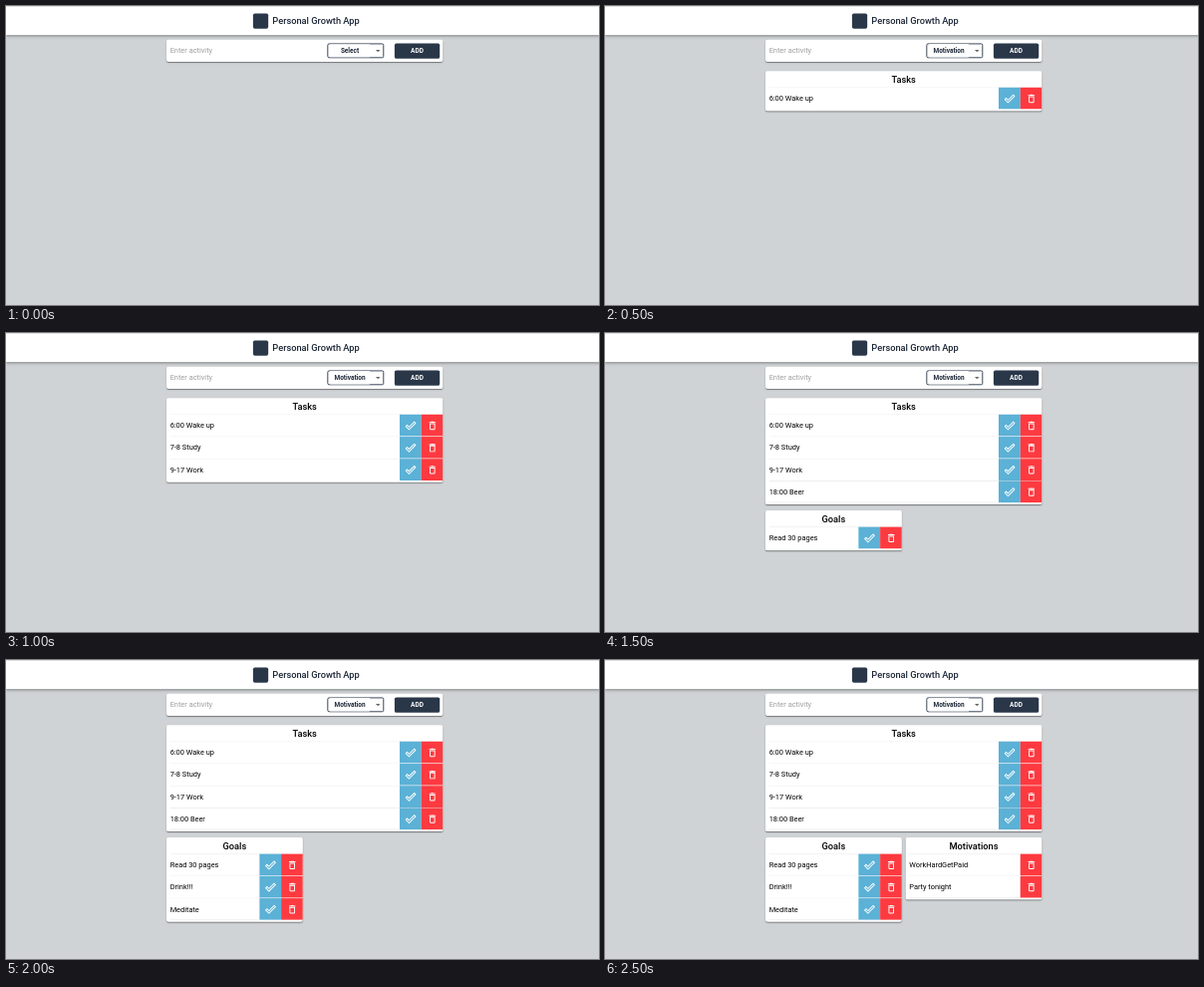
These frames come from a looping animation (595 px wide and 300 px high, 3000 ms). An HTML page:

```html
<!DOCTYPE html>
<html lang="en">
<head>
<meta charset="utf-8">
<title>Personal Growth App</title>
<style>
  html, body { margin: 0; width: 100%; height: 100%; overflow: hidden; background: #cfd3d5; }
  #app {
    position: absolute; left: 0; top: 0; width: 1288px; height: 650px;
    transform: scale(.4625); transform-origin: 0 0;
    font: 16px/48px Roboto, sans-serif; color: #000; white-space: nowrap;
  }
  #app * { box-sizing: border-box; }
  header, .logo, h1, .card, .field, .select, .select span, .select i, .add { position: absolute; margin: 0; }
  header {
    left: 0; top: 0; width: 100%; height: 63px; background: #fff; border-top: 1px solid #bbb;
    box-shadow: 0 2px 4px -1px #0003, 0 4px 5px #00000024, 0 1px 10px #0000001f;
  }
  .logo { left: 536px; top: 15px; width: 33px; height: 33px; border-radius: 4px; background: #2a3749; }
  h1, h2 { font-size: 20px; font-weight: 500; }
  h1 { left: 578px; top: 7px; color: #1d2737; }
  h2 { margin: 0; height: 35px; padding-top: 2px; line-height: 35px; text-align: center; }
  .card {
    padding-bottom: 4px; background: #fff; border-radius: 4px;
    box-shadow: 0 2px 1px -1px #0003, 0 1px 1px #00000024, 0 1px 3px #0000001f, 0 2px 3px #0004;
  }
  .bar { left: 348px; top: 73px; width: 600px; height: 48px; }
  .field { left: 8px; top: -1px; color: #9d9d9d; }
  .select {
    left: 349px; top: 8px; width: 123px; height: 32px; border: 2px solid #2a3749; border-radius: 4px;
    font: 700 14px/28px Roboto, sans-serif; text-align: center; color: #1d2737;
  }
  .select span { left: 4px; top: 0; width: 86px; background: #fff; }
  .select i { left: 103px; top: 12px; border: 5px solid transparent; border-top-color: #666; border-bottom: 0; }
  .add {
    left: 495px; top: 8px; width: 98px; height: 33px; border-radius: 4px; background: #2a3749; color: #fff;
    font: 700 14px/33px Roboto, sans-serif; letter-spacing: .4px; text-align: center;
  }
  .row { display: flex; overflow: hidden; padding-left: 8px; }
  .row p { flex: 1; margin: 0; height: 48px; border-top: 1px solid #ddd; }
  .row:last-child p { border-bottom: 1px solid #ddd; }
  .btn { width: 47px; height: 48px; padding: 12px 11.5px; border-top: 1px solid #e4e4e4; }
  .btn svg { display: block; width: 24px; height: 24px; fill: #fff; }
  .done { background: #5bb1d6; }
  .trash { background: #fd3a40; }

  .s1, .s2, .s3, .s4, .s5 { animation: 3s step-end infinite; }
  .s1 { animation-name: s1; }
  .s2 { animation-name: s2; }
  .s3 { animation-name: s3; }
  .s4 { animation-name: s4; }
  .s5 { animation-name: s5; }
  @keyframes s1 { 0% { max-height: 0; visibility: hidden } 16.6667%, 100% { max-height: 300px; visibility: visible } }
  @keyframes s2 { 0% { max-height: 0; visibility: hidden } 33.3333%, 100% { max-height: 300px; visibility: visible } }
  @keyframes s3 { 0% { max-height: 0; visibility: hidden } 50%, 100% { max-height: 300px; visibility: visible } }
  @keyframes s4 { 0% { max-height: 0; visibility: hidden } 66.6667%, 100% { max-height: 300px; visibility: visible } }
  @keyframes s5 { 0% { max-height: 0; visibility: hidden } 83.3333%, 100% { max-height: 300px; visibility: visible } }
</style>
</head>
<body>
<div id="app">
  <header><div class="logo"></div><h1>Personal Growth App</h1></header>
  <div class="card bar">
    <div class="field">Enter activity</div>
    <div class="select"><span>Select</span><span class="s1">Motivation</span><i></i></div>
    <div class="add">ADD</div>
  </div>
</div>
<script>
  const icons = {
    done: 'M19.77 5.03l1.4 1.4L8.43 19.17l-5.6-5.6 1.4-1.4 4.2 4.2L19.77 5.03m0-2.83L8.43 13.54l-4.2-4.2L0 13.57 8.43 22 24 6.43z',
    trash: 'M6 19c0 1.1.9 2 2 2h8c1.1 0 2-.9 2-2V7H6v12zM8 9h8v10H8V9zm7.5-5l-1-1h-5l-1 1H5v2h14V4z'
  };
  const button = kind =>
    `<div class="btn ${kind}"><svg viewBox="0 0 24 24"><path d="${icons[kind]}"/></svg></div>`;

  // Each item is [step at which it appears, label].
  function addCard(title, x, y, width, items, kinds) {
    const rows = items.map(([step, label]) =>
      `<div class="row s${step}"><p>${label}</p>${kinds.map(button).join('')}</div>`).join('');
    document.getElementById('app').insertAdjacentHTML('beforeend',
      `<section class="card s${items[0][0]}" style="left:${x}px;top:${y}px;width:${width}px"><h2>${title}</h2>${rows}</section>`);
  }

  addCard('Tasks', 348, 141, 600,
    [[1, '6:00 Wake up'], [2, '7-8 Study'], [2, '9-17 Work'], [3, '18:00 Beer']], ['done', 'trash']);
  addCard('Goals', 348, 385, 296,
    [[3, 'Read 30 pages'], [4, 'Drink!!!'], [4, 'Meditate']], ['done', 'trash']);
  addCard('Motivations', 652, 385, 296,
    [[5, 'WorkHardGetPaid'], [5, 'Party tonight']], ['trash']);
</script>
</body>
</html>
```
